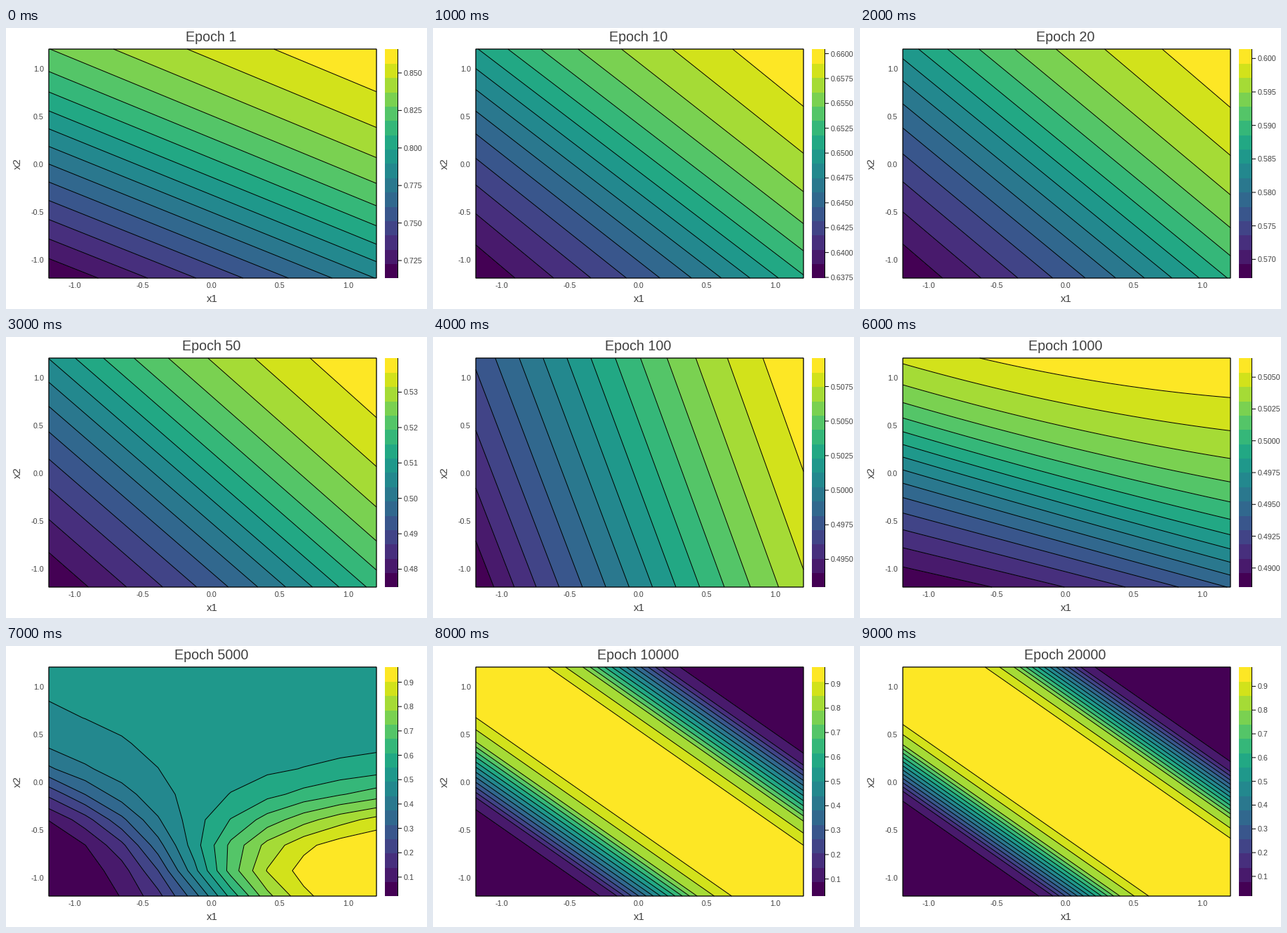
A matplotlib script for the animation above (10000 ms loop, 600 by 400 pixels).

```python
import numpy as np
import matplotlib.pyplot as plt
from matplotlib.animation import FuncAnimation
from matplotlib.patches import Rectangle

W, H, DPI = 600, 400, 100
LEFT, RIGHT, TOP, BOTTOM = 61, 528, 30, 356
WIDTH, HEIGHT = RIGHT - LEFT, BOTTOM - TOP
BANDS = 16
PX = 72 / DPI
INK = "#404040"
COLORS = plt.get_cmap("viridis")(np.linspace(0, 1, BANDS))


def net(n):
    return np.meshgrid(np.linspace(LEFT, RIGHT, n),
                       np.linspace(BOTTOM, TOP, n))


def plane(slope, twist=0, fan=0, skew=0, ess=0, bow=0):
    """Tilted sheet from the bottom left to the top right corner.

    twist and fan turn the contours, skew and ess space them unevenly,
    bow bends the upper ones.
    """
    x, y = net(100)
    u = (x - LEFT) / WIDTH
    v = np.linspace(-1, 1, 161)
    span = HEIGHT + (slope + twist + fan) * WIDTH
    warp = (1 - v**2) * (skew + ess * v + 0.06 * v**2)
    start = BOTTOM + span * (warp - (v + 1) / 2)
    w = np.zeros_like(x)
    for _ in range(12):
        sag = bow * ((w + 1) / 2) ** 3 * 4 * u * (1 - u)
        tilt = slope + twist * w + fan * w**2
        w = np.interp(y - tilt * (x - LEFT) - sag, start[::-1], v[::-1])
    return x, y, (w + 1) / 2 * BANDS


def saddle():
    """Flat above, a left-to-right step below that fades with height."""
    px, py = net(10)
    x = (px - LEFT) / WIDTH * 2.4 - 1.2
    y = (BOTTOM - py) / HEIGHT * 2.4 - 1.2
    floor = np.exp(-(y + 1.2) / 0.33)
    centre = 0.275 * floor - 0.22
    edge = 0.28 * np.maximum(-x - 0.25, 0) - 0.69
    steep = 2.9 * (1 - 0.3 * floor) / (1 + np.exp((y - edge) / 0.26))
    return px, py, 8.2 + 8.2 * np.tanh(steep * (x - centre))


def ridge(middle, pitch):
    """Bright diagonal band with even sides and wider outer contours."""
    x, y = net(240)
    far = np.abs(y - 0.697 * (x - LEFT) - 30)
    s = np.arange(BANDS, -1, -1)
    k = 7.5 - s
    outer = np.sign(k) * np.maximum(np.abs(k) - 5.5, 0)
    return x, y, np.interp(far, middle + pitch * (k + 1.4 * outer), s)


# epoch, lowest value, highest value, tick step, decimals, field
STAGES = [
    (1, 0.7133, 0.8659, 0.025, 3,
     plane(0.405, twist=0.012, skew=0.092, ess=0.113)),
    (10, 0.63743, 0.66046, 0.0025, 4,
     plane(0.763, twist=-0.02, fan=0.083, skew=0.081, ess=0.164)),
    (20, 0.5672, 0.6014, 0.005, 3,
     plane(0.814, fan=0.054, skew=0.073, ess=0.154)),
    (50, 0.47494, 0.53962, 0.01, 2,
     plane(0.865, twist=0.013, fan=0.026, skew=0.0655, ess=0.144)),
    (100, 0.49299, 0.50956, 0.0025, 4,
     plane(2.676, twist=0.136, skew=0.089, ess=0.045)),
    (500, 0.47061, 0.52781, 0.01, 2,
     plane(0.308, twist=-0.026, fan=-0.102, skew=0.032, ess=0.147, bow=8)),
    (1000, 0.4885, 0.5065, 0.0025, 4,
     plane(0.28, twist=-0.026, fan=-0.1, skew=0.035, ess=0.14, bow=14)),
    (5000, 0.022, 0.962, 0.1, 1, saddle()),
    (10000, 0.03, 0.968, 0.1, 1, ridge(146, 7.2)),
    (20000, 0.017, 0.981, 0.1, 1, ridge(143.5, 6)),
]

plt.rcParams["font.family"] = "Liberation Sans"
plt.rcParams["path.snap"] = False
fig = plt.figure(figsize=(W / DPI, H / DPI), dpi=DPI, facecolor="white")
ax = fig.add_axes([0, 0, 1, 1])


def text(x, y, s, size=10.8, ha="center", **kw):
    ax.text(x, y, s, size=size * PX, ha=ha, va=kw.pop("va", "baseline"),
            color=INK, **kw)


def line(xs, ys, width=1):
    ax.plot(xs, ys, color="black", lw=width * PX, zorder=5,
            solid_capstyle="butt")


def draw_axes():
    ax.add_patch(Rectangle((LEFT, TOP), WIDTH, HEIGHT, fill=False,
                           ec="black", lw=1.3 * PX, zorder=5))
    for v in (-1, -0.5, 0, 0.5, 1):
        text(292.7 + 195 * v, 370, f"{v:.1f}")
        text(53.7, 198 - 136 * v, f"{v:.1f}", ha="right")
    text(293.3, 390, "x1", 15)
    text(16.5, 193.5, "x2", 15, va="center", rotation=90)


def draw_bar(lo, hi, step, decimals):
    band = HEIGHT / BANDS
    for k, color in enumerate(COLORS):
        ax.add_patch(Rectangle((540, BOTTOM - (k + 1) * band), 18, band,
                               fc=color, lw=0, antialiased=False))
    line([558.5, 558.5], [TOP, BOTTOM])
    for n in range(int(np.ceil(lo / step)), int(np.floor(hi / step)) + 1):
        v = n * step
        y = BOTTOM - (v - lo) / (hi - lo) * HEIGHT
        line([558, 564], [y, y])
        text(567, y + 4, f"{v:.{decimals}f}", ha="left")


def update(i):
    epoch, lo, hi, step, decimals, (x, y, g) = STAGES[i]
    ax.clear()
    ax.axis("off")
    ax.set_autoscale_on(False)
    g = np.clip(g, 0.01, BANDS - 0.01)
    ax.contourf(x, y, g, levels=range(BANDS + 1), colors=COLORS)
    ax.contour(x, y, g, levels=range(1, BANDS), colors="black",
               linewidths=PX)
    draw_axes()
    draw_bar(lo, hi, step, decimals)
    text(292.3, 19.3, f"Epoch {epoch}", 19.8)
    ax.set_xlim(0, W)
    ax.set_ylim(H, 0)
    return []


anim = FuncAnimation(fig, update, frames=len(STAGES), interval=1000,
                     repeat=True, repeat_delay=0)
plt.show()
```
